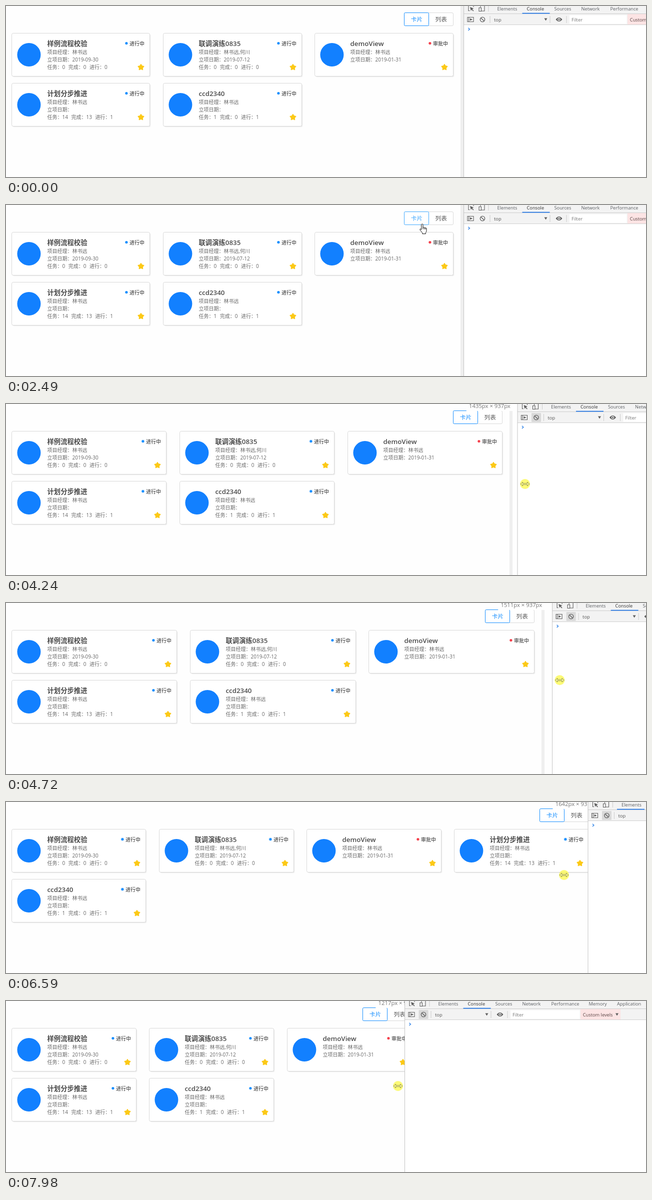
These frames come from a looping animation (1280 by 342 pixels, 8000 ms). An HTML page:

```html
<!DOCTYPE html>
<html lang="zh-CN">
<head>
<meta charset="utf-8">
<title>Project cards</title>
<style>
  html, body { margin: 0; width: 100%; height: 100%; overflow: hidden; background: #fefefe; }
  svg { display: block; width: 100vw; height: 100vh; }
  text { font-family: 'Open Sans', 'Noto Sans CJK SC', 'Noto Sans CJK JP', sans-serif; white-space: pre; }
</style>
</head>
<body>
<svg id="stage" viewBox="0 0 1280 342" xmlns="http://www.w3.org/2000/svg"></svg>
<script>
const stage = document.getElementById('stage');
const LOOP = 8000, LIST_ON = 930, LIST_OFF = 2380, DRAG = 3440;
const BLUE = '#1890ff', HOVER = '#40a9ff', GREY = '#595959', LEFT = 11.8, GAP = 26.7;
const LEAD = '林书远', DEPT = '系统管理部';

const projects = [
  { name: '样例流程校验', kind: 'IT测试', who: LEAD, date: '2019-09-30', dept: DEPT, tasks: [0, 0, 0] },
  { name: '联调演练0835', kind: 'IT测试', who: LEAD + ',何川', date: '2019-07-12', dept: DEPT, tasks: [0, 0, 0] },
  { name: 'demoView', kind: 'IT测试', who: LEAD, date: '2019-01-31', dept: DEPT, review: true },
  { name: '计划分步推进', kind: '互联网IT项目', who: LEAD, date: '', dept: DEPT, tasks: [14, 13, 1] },
  { name: 'ccd2340', kind: 'IT项目', who: LEAD, date: '', dept: '', tasks: [1, 0, 1] }
];

// Motion keys: time, then values
const pointerKeys = [
  [70, 1124, 277], [250, 1010, 150], [450, 890, 48], [600, 867, 23], [2030, 867, 23],
  [2230, 824, 25], [2450, 824, 25], [2790, 895, 135], [2880, 904, 152], [3090, 916, 172],
  [3440, 916, 172], [3550, 928, 171], [4240, 1038, 160], [5250, 1184, 148], [5650, 1198, 147],
  [6040, 1199, 147], [6420, 1192, 147], [6590, 1116, 146], [6910, 1015, 152], [7680, 850, 166], [7980, 784, 170]
];
const dividerKeys = [
  [3440, 915.5], [3550, 919.5], [4240, 1023], [5250, 1169.5], [5650, 1190], [6420, 1190],
  [6500, 1183], [6590, 1164], [6910, 1045], [7680, 866], [7980, 797.5]
];
const pageKeys = [
  [3440, 895], [3550, 896], [4240, 993.3], [4330, 999], [5100, 1113], [5180, 1131.5], [5250, 1133.3],
  [5650, 1168], [6420, 1170], [6590, 1166], [6840, 1100], [6910, 1074], [7680, 890], [7980, 811.9]
];

function at(keys, t) {
  if (t <= keys[0][0]) return keys[0].slice(1);
  for (let i = 1; i < keys.length; i++) {
    const a = keys[i - 1], b = keys[i];
    if (t <= b[0]) {
      const k = (t - a[0]) / (b[0] - a[0]);
      return a.slice(1).map((v, j) => v + (b[j + 1] - v) * k);
    }
  }
  return keys[keys.length - 1].slice(1);
}

const text = (x, y, s, size, fill, more = '') =>
  `<text x="${x}" y="${y}" font-size="${size}" fill="${fill}" ${more}>${s}</text>`;
const rect = (x, y, w, h, fill, more = '') =>
  `<rect x="${x}" y="${y}" width="${w}" height="${h}" fill="${fill}" ${more}/>`;
const path = (d, more) => `<path d="${d}" ${more}/>`;
const circle = (x, y, r, fill, more = '') =>
  `<circle cx="${x}" cy="${y}" r="${r}" fill="${fill}" ${more}/>`;
const group = (x, y, body) => `<g transform="translate(${x} ${y})">${body}</g>`;
const snap = v => Math.round(v) - 0.5;

const starPath = 'M' + Array.from({ length: 10 }, (_, i) => {
  const r = i % 2 ? 3.5 : 6.1, a = i * Math.PI / 5 - Math.PI / 2;
  return (r * Math.cos(a)).toFixed(2) + ' ' + (r * Math.sin(a)).toFixed(2);
}).join('L') + 'Z';
const star = (x, y) =>
  group(x, y, path(starPath, 'fill="#fcc917" stroke="#fcc917" stroke-width="1.4" stroke-linejoin="round"'));

function dot(x, y, t, color) {
  const p = Math.min(1, t % 1200 / 720);
  const ring = color === BLUE
    ? circle(x, y, 2.2 + 2.6 * p, color, `opacity="${0.45 * (1 - p)}"`) : '';
  return ring + circle(x, y, 2.6, color);
}

function card(p, x, y, w, t) {
  const line = (row, s) => text(71, 42.2 + row * 15.1, s, 10, '#666');
  const frame = d => `x="${d}" y="${d + 0.5}" width="${w}" height="86" rx="3"`;
  let s = `<rect ${frame(2)} fill="#000" opacity=".04"/><rect ${frame(1)} fill="#000" opacity=".06"/>`;
  s += `<rect ${frame(0)} fill="#fff" stroke="#d9d9d9"/>`;
  s += circle(34.4, 43.5, 23.5, '#1280ff');
  s += text(71, 26, p.name, 13.33, '#4a4a4a', 'font-weight="600"');
  s += line(0, '项目经理：' + p.who) + line(1, '立项日期：' + p.date);
  if (p.tasks) {
    const labels = ['任务：', '完成：', '进行：'];
    s += line(2, labels.map((l, i) => `<tspan dx="${i ? 6.5 : 0}">${l}${p.tasks[i]}</tspan>`).join(''));
  }
  s += dot(w - 46.6, 20.5, t, p.review ? '#f5414d' : BLUE);
  s += text(w - 40.5, 25, p.review ? '审批中' : '进行中', 10, '#222');
  return group(x, y, s + star(w - 17.6, 68.6));
}

function cards(right, t) {
  const cols = right >= 1131 ? 4 : 3;
  const w = (right - LEFT - GAP * (cols - 1)) / cols;
  return projects.map((p, i) => {
    const x = LEFT + (i % cols) * (w + GAP), left = snap(x);
    return card(p, left, 54 + Math.floor(i / cols) * 100, snap(x + w) - left, t);
  }).join('');
}

function table(t) {
  const size = 11.67, tops = [88, 136.3, 184.8, 233.3, 266.5, 300];
  const cols = [45.7, 109, 230, 293.7, 526.8, 592.7, 686, 779.5];
  const heads = ['所属品类', '项目类别', '项目编号', '项目名称', '项目状态', '项目经理', '所属部门', '项目计划时间'];
  const frame = (fill, more) => rect(11.5, 54.5, 883, 245, fill, `rx="3" ${more}`);
  let s = frame('#fff', '');
  s += heads.map((h, i) => text(cols[i], 75.6, h, size, '#262626', 'font-weight="600"')).join('');
  s += rect(12, 87, 883, 1, '#e8e8e8');
  projects.forEach((p, i) => {
    const top = tops[i], h = tops[i + 1] - top, mid = top + h / 2, y = mid + 4.4;
    const cell = (c, v, dy = 0, dx = 0) => text(cols[c] + dx, y + dy, v, size, GREY);
    if (i % 2) s += rect(12, top, 882, h, '#f8fafa');
    s += star(25.7, mid) + cell(0, '其他') + cell(1, p.kind) + cell(3, p.name);
    s += dot(529.6, mid - 0.5, t, p.review ? '#b5713c' : BLUE);
    s += cell(4, p.review ? '审批中' : '进行中', 0, 8.4) + cell(5, p.who) + cell(6, p.dept);
    s += p.date
      ? cell(7, `${p.date} ~ ${p.date.slice(0, 5)}`, -8.4) + cell(7, p.date.slice(5), 9)
      : cell(7, '~');
  });
  return s + frame('none', 'stroke="#d9d9d9"');
}

function toggle(right, list, t) {
  const x = snap(right) - 98;
  const overList = t > 560 && t < 2120, overCards = t >= 2120 && t < 2520;
  const tint = (on, over) => over ? HOVER : on ? BLUE : GREY;
  const a = tint(!list, overCards), b = tint(list, overList);
  return rect(x, 13.5, 98, 26, '#fff', 'rx="2.5" stroke="#d9d9d9"')
    + rect(list ? x + 49 : x, 13.5, 49, 26, '#fff', `rx="2" stroke="${list ? b : a}"`)
    + text(x + 25, 31, '卡片', 11.67, a, 'text-anchor="middle"')
    + text(x + 73.7, 31, '列表', 11.67, b, 'text-anchor="middle"');
}

function page(right, t) {
  const list = t >= LIST_ON && t < LIST_OFF;
  let s = rect(Math.round(right) + 14, 0, 6, 342, '#efefef');
  s += list ? table(t) : cards(right, t);
  s += toggle(right, list, t);
  if (t >= DRAG) {
    const px = Math.round((right + 202.3) * 1.2);
    s += rect(right - 72.5, 0, 93, 14, '#fefefe');
    s += text(right - 67.3, 8.4, `${px}px × 937px`, 11.3, '#777');
  }
  return s;
}

function tabs(d, t) {
  const names = { Elements: 67, Console: 126, Sources: 181, Network: 235, Performance: 293, Memory: 368, Application: 424.5 };
  if (d > 1166) return text(67.5, 9, 'Console', 9.25, '#333');
  const back = t < 6000 ? 1 : Math.max(0, Math.min(1, (t - 6590) / 200));
  return Object.entries(names).map(([n, x]) =>
    text(x, 9, n, 9.25, n === 'Console' ? '#333' : '#5c5f63')).join('')
    + rect(58 + 59 * back, 13.8, 55, 1.6, '#1a73e8');
}

function tools(d, t) {
  const ink = 'fill="none" stroke="#5f5f5f" stroke-width="1.1"';
  const sep = (x, y, h) => rect(x, y, 1, h, '#ccc');
  const caret = (x, y) => path(`M${x - 3} ${y - 2.5}h6l-3 5z`, 'fill="#5f5f5f"');
  const levels = 327.5 + Math.max(0, 900 - d) * 0.234;
  let s = rect(0, 0, 700, 342, '#fff') + rect(0, 0, 700, 38, '#f3f3f3');
  s += rect(0, 15, 700, 1, '#ccc') + rect(0, 37, 700, 1, '#d0d0d0');
  // Top bar icons
  s += path('M12 9.5H9.5V0M19.5 0V2', ink) + path('M12.5 2l7.5 3-3 1.2 3 3.3-1.2 1.1-3-3.3-1.4 2.4z', 'fill="#5f5f5f"');
  s += path('M33.5 2.5V0M41.5 0V10H35M30.5 3.5H35V10.5H30.5Z', ink) + sep(49, 0, 11);
  s += tabs(d, t);
  // Console bar
  s += path('M7.5 22.5H19.5V31.5H7.5ZM10.3 22.5V31.5', ink) + path('M12.5 24.5l5 2.5-5 2.5z', 'fill="#5f5f5f"');
  if (t >= DRAG) s += rect(28, 18, 19, 18, '#d9d9d9', 'rx="1"');
  s += circle(37.5, 27, 4.6, 'none', 'stroke="#5f5f5f" stroke-width="1.4"');
  s += path('M34.2 23.8l6.6 6.4', 'fill="none" stroke="#5f5f5f" stroke-width="1.4"');
  s += sep(52, 20, 14) + text(60.5, 30.6, 'top', 9.4, '#555') + caret(164, 27) + sep(172, 20, 14);
  s += path('M184 27q6.5-8 13 0q-6.5 8-13 0z', 'fill="#5f5f5f"');
  s += circle(190.5, 27, 2.7, '#f3f3f3') + circle(190.5, 27, 1.5, '#5f5f5f') + sep(205, 20, 14);
  s += rect(211.5, 18.5, levels - 213, 17, '#fff') + text(215.5, 31, 'Filter', 9.4, '#777');
  s += rect(levels, 16, 80, 21, '#fce4e4') + text(levels + 4.8, 30.6, 'Custom levels', 9.25, '#5a4545') + caret(levels + 73, 27);
  s += path('M9 43.8l2.8 2.6-2.8 2.6', 'fill="none" stroke="#3b8ae8" stroke-width="1.5"');
  return group(d, 0, s + rect(-0.5, 0, 1, 342, '#c4c4c4'));
}

function pointer(t) {
  if (t < 70) return '';
  const [x, y] = at(pointerKeys, t);
  const line = 'stroke="#111" stroke-width="1" stroke-linejoin="round"';
  const press = (t >= 850 && t < 1000) || (t >= 2290 && t < 2440) || t >= 3040;
  let s = press ? circle(0, 0, 10, '#fbf84a', 'opacity=".75"') : '';
  if (t >= 3000) {
    s += path('M-9 0l4.5-3.8v2.6h9v-2.6l4.5 3.8-4.5 3.8v-2.6h-9v2.6z', 'fill="#fbfa9a" stroke="#77773a" stroke-width=".8"');
  } else if (t > 520 && t < 2520) {
    s += path('M-1.6 1q1.6-2.4 3.2 0v6q1.5-1.3 2.6.4q1.6-1 2.4.6q1.9-.6 2 1.4v4.1q-.2 2.5-1.6 4v2.2h-6.6v-2l-4.6-5.6q-1-2 .6-2.4l2 1.7z', `fill="#fff" ${line}`);
    s += path('M1.6 7v3.4M4.2 7.8v2.8M6.6 8.4v2.4', `fill="none" ${line}`);
  } else {
    s += path('M0 0v15.5l3.6-3.4 2.5 5.6 2.4-1-2.5-5.5h4.9z', `fill="#fff" ${line}`);
  }
  return group(x, y, s);
}

function draw(now) {
  const t = now % LOOP;
  const [right] = at(pageKeys, t), [d] = at(dividerKeys, t);
  stage.innerHTML = rect(0, 0, 1280, 342, '#fefefe') + page(right, t) + tools(d, t) + pointer(t);
}

let start;
function tick(now) {
  start ??= now;
  draw(now - start);
  requestAnimationFrame(tick);
}
draw(0);
requestAnimationFrame(tick);
</script>
</body>
</html>
```
